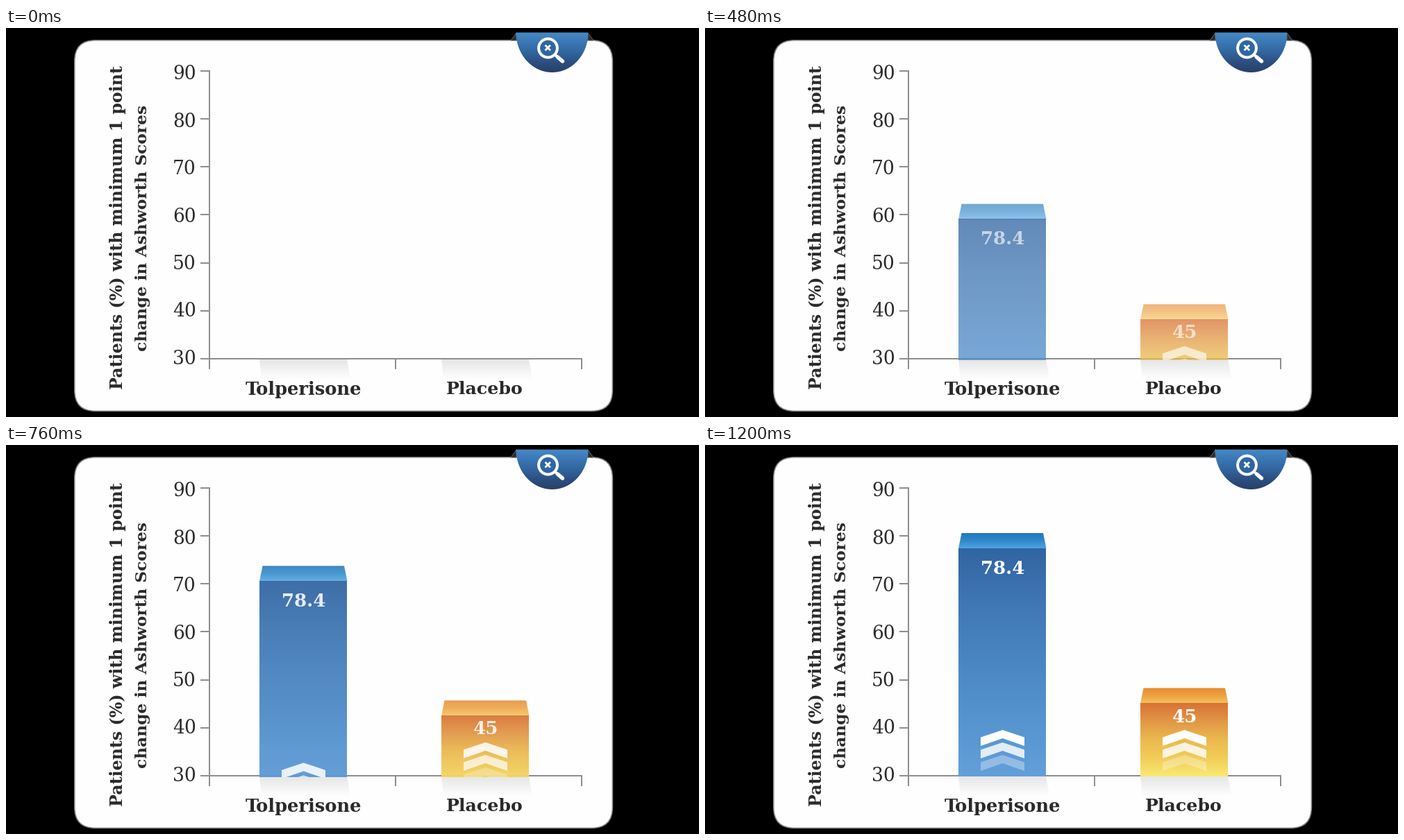
These frames come from a looping animation (998x561 px, 8000 ms). A matplotlib script:

```python
import numpy as np
import matplotlib.pyplot as plt
from matplotlib.animation import FuncAnimation
from matplotlib.colors import LinearSegmentedColormap
from matplotlib.patches import Circle, FancyBboxPatch, Polygon
from matplotlib.path import Path
from matplotlib.transforms import Affine2D

W, H, DPI = 998, 561, 64
PX = 72 / DPI                  # points per pixel
STEP_MS, LOOP_MS, RISE_MS = 40, 8000, 1200
BASE, FLOOR = 478, 479         # bar bottom and the edge that hides the rest
INK, AXIS = "#2a2a2c", "#8e8e90"

plt.rcParams["font.family"] = "DejaVu Serif"
fig = plt.figure(figsize=(W / DPI, H / DPI), dpi=DPI, facecolor="black")


def pixel_axes(height):
    """Axes in pixel units from the top of the stage down to a height."""
    ax = fig.add_axes([0, 1 - height / H, 1, height / H])
    ax.set(xlim=(0, W), ylim=(height, 0), autoscale_on=False)
    ax.axis("off")
    return ax


def gradient(ax, points, colors, trans=None, zorder=1.5):
    """Fill a polygon with a vertical gradient."""
    trans = ax.transData if trans is None else trans
    pts = np.asarray(points, float)
    (x0, y0), (x1, y1) = pts.min(axis=0), pts.max(axis=0)
    ramp = LinearSegmentedColormap.from_list("ramp", colors)(np.linspace(0, 1, 256))
    img = ax.imshow(ramp[:, None, :3].repeat(2, axis=1), aspect="auto",
                    extent=(x0, x1, y1, y0), interpolation="bilinear",
                    zorder=zorder)
    img.set_transform(trans)
    img.set_clip_path(Path(np.vstack([pts, pts[:1]])), trans)
    return img


def line(ax, xs, ys, color=AXIS, width=2, cap="butt", zorder=2):
    ax.plot(xs, ys, color=color, lw=width * PX, solid_capstyle=cap, zorder=zorder)


def label(ax, x, y, text, size, weight="bold", ha="center", color=INK, **kw):
    return ax.text(x, y, text, fontsize=size * PX, weight=weight, ha=ha,
                   va="baseline", color=color, **kw)


class Bar:
    """A bevelled bar that slides up from behind the axis while fading in."""

    def __init__(self, ax, left, top, value, value_y, drop, front, bevel, fades):
        self.drop, self.slide = drop, Affine2D()
        trans = self.slide + ax.transData
        right, mid = left + 126.5, left + 63.5
        lid, seam = top - 21.5, top + 0.7
        lid_img = gradient(ax, [(left + 4.5, lid), (right - 4.5, lid),
                                (right, seam), (left, seam)], bevel, trans)
        self.front = gradient(ax, [(left, top), (right, top), (right, BASE),
                                   (left, BASE)], front, trans)
        number = label(ax, mid + 0.5, top + value_y, value, 26, color="white",
                       transform=trans, clip_on=True)
        self.parts = [(lid_img, 1), (number, 1)]
        for i, fade in enumerate(fades):
            y = 411 + 18 * i
            arrow = Polygon([(mid, y), (mid + 31.5, y + 10.5), (mid + 31.5, y + 23),
                             (mid, y + 12), (mid - 31.5, y + 23),
                             (mid - 31.5, y + 10.5)],
                            fc="white", ec="none", transform=trans, zorder=3)
            ax.add_patch(arrow)
            self.parts.append((arrow, fade))

    def pose(self, ease):
        self.slide.clear().translate(0, self.drop * (1 - ease))
        self.front.set_alpha(1 - (1 - ease) ** 1.4)
        for part, fade in self.parts:
            part.set_alpha(ease * fade)


def draw_panel(ax):
    ax.add_patch(FancyBboxPatch((98.8, 17.8), 774.6, 534.6, fc="#fefefe",
                                ec="#8a8a8a", lw=1.6 * PX,
                                boxstyle="round,pad=0,rounding_size=30"))
    label(ax, 168, 287.5, "Patients (%) with minimum 1 point", 23.7,
          rotation=90, rotation_mode="anchor")
    label(ax, 203, 288.5, "change in Ashworth Scores", 23.4,
          rotation=90, rotation_mode="anchor")
    label(ax, 429, 528.5, "Tolperisone", 25.7)
    label(ax, 689.5, 528.5, "Placebo", 25.3)

    # soft reflections under the bars
    for left in (365, 627):
        gradient(ax, [(left, BASE), (left + 126, BASE), (left + 131, 506),
                      (left + 3, 506)], ["#e6e6e6", "#f2f2f2", "#fefefe"])

    for i in range(7):
        y = 61.5 + 69.25 * i
        line(ax, (280, 293), (y, y))
        label(ax, 274, 74.4 + 68.4 * i, str(90 - 10 * i), 26.5,
              weight="normal", ha="right")
    line(ax, (293.5, 293.5), (60.5, 492))
    line(ax, (293, 830), (477, 477))
    for x in (561.5, 829.5):
        line(ax, (x, x), (477, 492))


def draw_badge(ax):
    for edge, tip in ((735, 727), (838, 846)):
        ax.add_patch(Polygon([(tip, 18), (edge, 7), (edge, 18)], fc="#2b2b2b",
                             ec="#777777", lw=0.7 * PX, zorder=2))
    a = np.linspace(0, np.pi, 60)
    shape = np.column_stack([786.5 + 52 * np.cos(a), 6.5 + 57.5 * np.sin(a)])
    gradient(ax, shape, ["#4689c6", "#3a78b4", "#32659f", "#2c4f7f", "#2a3f66"],
             zorder=3)
    ax.add_patch(Circle((780.5, 29), 13.4, fc="#2f66a3", ec="white",
                        lw=4 * PX, zorder=4))
    line(ax, (790, 795), (38, 42.5), "white", 4, zorder=5)
    line(ax, (794.5, 801.5), (42, 48), "white", 5.5, "round", zorder=5)
    for s in (1, -1):
        line(ax, (776.5, 784), (28.5 - 3.8 * s, 28.5 + 3.8 * s), "white", 2.8,
             zorder=5)


stage = pixel_axes(H)
draw_panel(stage)
draw_badge(stage)

window = pixel_axes(FLOOR)
bars = [
    Bar(window, 365, 148.5, "78.4", 37, 352,
        ["#3164a2", "#3f78b5", "#4a86c2", "#5594d0", "#649fd9"],
        ["#1f76bb", "#2f87ca", "#50a4df"], (1, 0.82, 0.33)),
    Bar(window, 627, 372, "45", 27.5, 133,
        ["#d87236", "#e29746", "#ebb950", "#f1cd58", "#f9ea74"],
        ["#e88a30", "#eda242", "#f3c65c"], (1, 0.82, 0.3)),
]


def update(n):
    u = min(n * STEP_MS / RISE_MS, 1)
    ease = 1 - (1 - u) ** 2
    for bar in bars:
        bar.pose(ease)
    return []


anim = FuncAnimation(fig, update, frames=LOOP_MS // STEP_MS, interval=STEP_MS,
                     init_func=lambda: update(0), repeat=True, repeat_delay=0,
                     blit=False)
plt.show()
```
